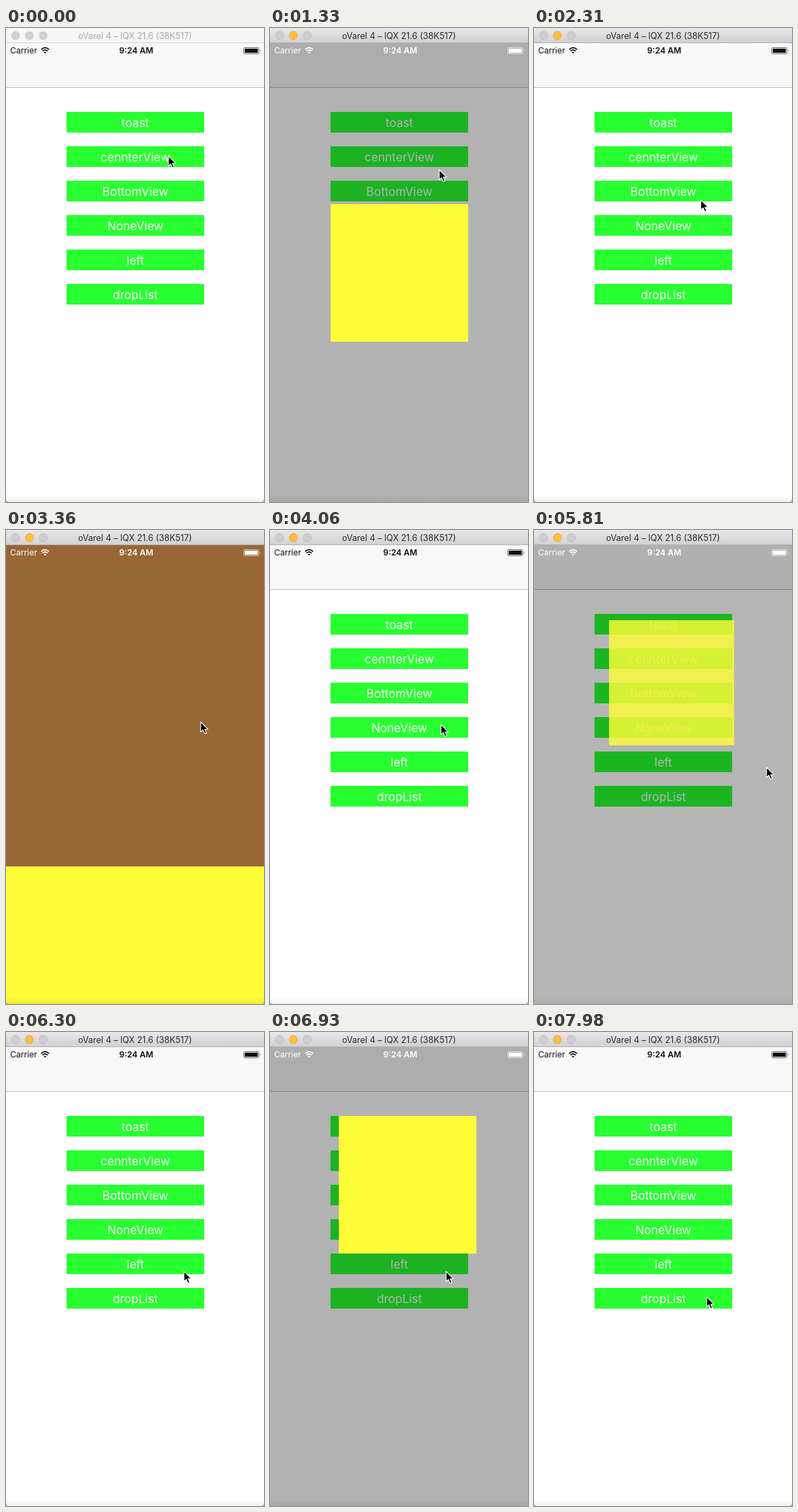
An HTML page that plays this animation: 375x689 px, repeating every 8000 ms.

```html
<!DOCTYPE html>
<html lang="en">
<head>
<meta charset="utf-8">
<title>Popup demo</title>
<style>
  html, body { margin: 0; width: 100%; height: 100%; overflow: hidden; background: #fff; }
  svg { display: block; width: 100%; height: 100%; }
  text { font-family: Inter, Roboto, sans-serif; text-anchor: middle; }
</style>
</head>
<body>
<svg viewBox="0 0 375 689">
  <defs>
    <linearGradient id="bar" x2="0" y2="1">
      <stop stop-color="#e9e7e9"/><stop offset="1" stop-color="#d1cfd1"/>
    </linearGradient>
    <linearGradient id="foot" x2="0" y2="1">
      <stop stop-opacity="0"/><stop offset="1" stop-opacity=".06"/>
    </linearGradient>
  </defs>
  <rect y="22" width="375" height="667" fill="#fff"/>
  <rect y="22" width="375" height="64" fill="#f8f8f8"/>
  <rect y="86" width="375" height="1" fill="#bcbcbc"/>
  <g id="buttons" font-size="17" fill="#fff"></g>
  <rect id="shade" y="22" width="375" height="667"/>
  <rect id="panel" fill="#fffd38"/>

  <g id="status" font-size="12">
    <text x="6" y="37" style="text-anchor:start">Carrier</text>
    <text x="189.3" y="37" font-weight="600">9:24 AM</text>
    <g fill="none" stroke="currentColor" stroke-width="1.7">
      <path d="M51.1 31.3Q56.8 25.9 62.5 31.3M53.1 33.6Q56.8 30.1 60.5 33.6"/>
      <path d="M56.8 37.3L54.9 35.3Q56.8 33.7 58.7 35.3Z" fill="currentColor" stroke="none"/>
      <rect x="345.5" y="28.5" width="22" height="9" rx="1.8" stroke-width="1" stroke-opacity=".65"/>
      <rect x="347" y="30" width="19" height="6" rx=".6" fill="currentColor" stroke="none"/>
      <path d="M369 31.3q1.3 1.7 0 3.4z" fill="currentColor" stroke="none"/>
    </g>
  </g>

  <rect id="titlebar" width="375" height="22"/>
  <rect id="rule" y="21" width="375" height="1"/>
  <g id="lights" stroke-width=".7"></g>
  <text id="title" x="187.5" y="16" font-size="12.5">oVarel 4 – lQX 21.6 (38K517)</text>

  <rect y="679" width="375" height="10" fill="url(#foot)"/>
  <path d="M0 684v5h5q-5 0-5-5zM375 684v5h-5q5 0 5-5z" fill="#b5b5b5"/>
  <path id="cursor" d="M0 0V14.6L3.3 11.6L5.9 17.3L8.4 16.2L5.9 10.7H10.6Z"
        stroke="#fff" stroke-width="1.1" stroke-linejoin="round"/>
</svg>
<script>
const LOOP = 8000;
const $ = id => document.getElementById(id);
const set = (el, attrs) => {
  for (const key in attrs) el.setAttribute(key, attrs[key]);
  return el;
};
const add = (parent, tag, attrs) =>
  parent.appendChild(set(document.createElementNS('http://www.w3.org/2000/svg', tag), attrs));
const clamp = v => Math.max(0, Math.min(1, v));
const smooth = v => v * v * (3 - 2 * v);

['toast', 'cennterView', 'BottomView', 'NoneView', 'left', 'dropList'].forEach((label, i) => {
  const y = 122 + i * 50;
  add($('buttons'), 'rect', { x: 88, y, width: 200, height: 30, fill: '#28ff30' });
  add($('buttons'), 'text', { x: 188, y: y + 21.7 }).textContent = label;
});
const lights = [14, 34, 54].map(cx => add($('lights'), 'circle', { cx, cy: 11, r: 6 }));

const zoom = (cx, cy) => k => {
  const size = 100 + 100 * k;
  return { x: cx - size / 2, y: cy - size / 2, width: size, height: size, opacity: k };
};
const square = (x, y, width) => ({ x, y, width, height: 200, opacity: 1 });
const dim = k => ({ fill: '#000', opacity: 0.3 * (1 - (1 - k) ** 2) });
const brown = k => ({ fill: '#996635', opacity: k });

// Each popup opens at `from` and starts closing at `to`.
const popups = [
  { from: 540, to: 1750, place: zoom(188, 356), shade: dim },
  { from: 2620, to: 3520, place: k => square(0, 689 - 200 * smooth(k), 375), shade: brown },
  { from: 4690, to: 5760, place: zoom(200, 222), shade: dim },
  { from: 6520, to: 7640, place: k => square(-200 + 300 * smooth(k), 122, 200), shade: dim }
];
const OPEN = 300, CLOSE = 280;

// Pointer stops: time, x, y
const stops = [
  [0, 236, 186], [800, 236, 186], [1250, 246, 206], [1340, 246, 206],
  [1660, 309, 440], [1820, 309, 440], [2400, 238, 237], [2750, 238, 237],
  [3250, 283, 279], [3700, 283, 279], [4300, 230, 285], [4800, 230, 285],
  [5550, 338, 345], [5900, 338, 345], [6350, 256, 348], [6960, 256, 348],
  [7460, 350, 385], [7660, 350, 385], [7930, 251, 385], [LOOP, 251, 385]
];

function pointer(t) {
  const i = stops.findIndex(s => s[0] > t);
  const [t0, x0, y0] = stops[i - 1], [t1, x1, y1] = stops[i];
  const k = smooth((t - t0) / (t1 - t0));
  return [x0 + (x1 - x0) * k, y0 + (y1 - y0) * k];
}

function draw(t) {
  const active = t >= 210;
  set($('titlebar'), { fill: active ? 'url(#bar)' : '#f6f6f6' });
  set($('rule'), { fill: active ? '#b3b1b3' : '#d6d6d6' });
  set($('title'), { fill: active ? '#2b2b2b' : '#aaa6aa' });
  lights.forEach((dot, i) => {
    const amber = active && i === 1;
    set(dot, {
      fill: amber ? '#fdbe40' : active ? '#cfcdcf' : '#d2d0d2',
      stroke: amber ? '#e3a12e' : active ? '#b7b5b7' : '#cdcbcd'
    });
  });

  const popup = popups.find(p => t >= p.from && t < p.to + CLOSE);
  if (popup) {
    const k = clamp((t - popup.from) / OPEN) - clamp((t - popup.to) / CLOSE);
    set($('panel'), popup.place(k));
    set($('shade'), popup.shade(k));
  } else {
    set($('panel'), { opacity: 0 });
    set($('shade'), { opacity: 0 });
  }
  const ink = popup ? '#fff' : '#111';
  set($('status'), { fill: ink, color: ink });
  set($('cursor'), { transform: `translate(${pointer(t)})` });
}

const start = performance.now();
function tick() {
  draw((performance.now() - start) % LOOP);
  requestAnimationFrame(tick);
}
tick();
</script>
</body>
</html>
```
